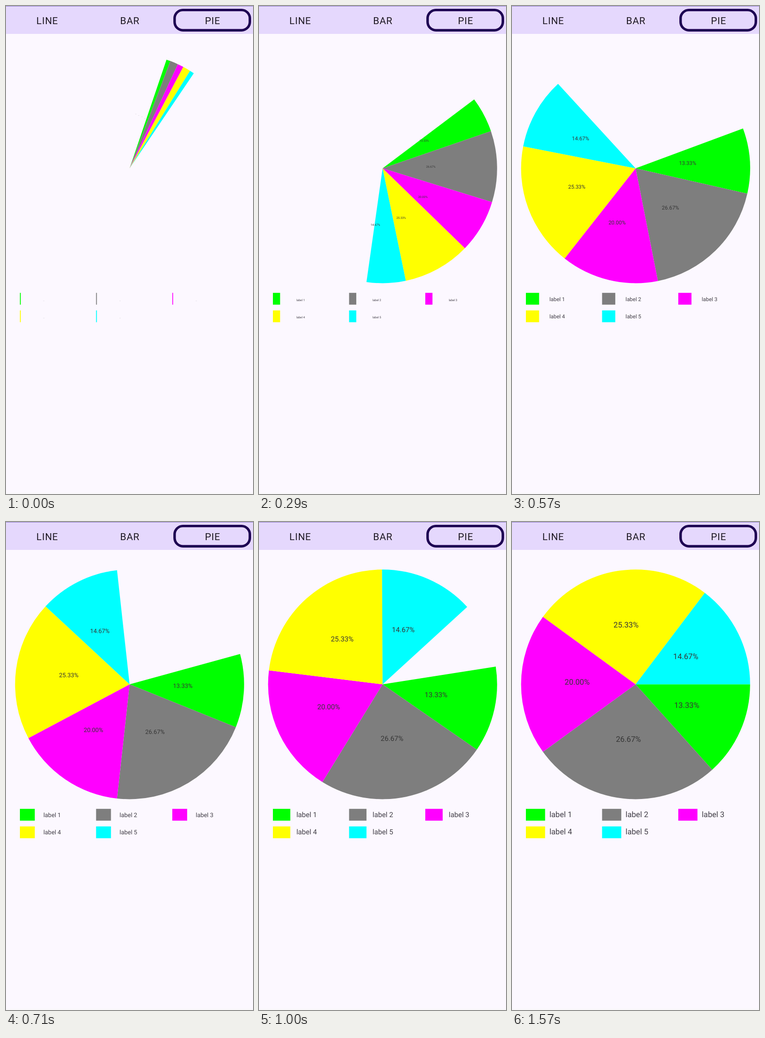
These frames come from a looping animation (533x1050 px, 1.71 s). An HTML page:

```html
<!DOCTYPE html>
<html lang="en">
<head>
<meta charset="utf-8">
<title>Pie chart</title>
<style>
  html, body { margin: 0; width: 100%; height: 100%; overflow: hidden; background: #fcf8ff; }
  svg { display: block; width: 100%; height: 100%; }
  text { font-family: Roboto, "Open Sans", sans-serif; fill: #423f47; text-rendering: geometricPrecision; }
  .tab { font-size: 21px; letter-spacing: .75px; text-anchor: middle; fill: #1f1a24; }
  .share { fill: #363636; }
</style>
</head>
<body>
<svg id="stage" viewBox="0 0 533 1050">
  <rect width="533" height="60" fill="#e5d8fd"/>
  <rect width="533" height="1" fill="#9480d0"/>
  <rect x="363.8" y="8.6" width="162.4" height="43.6" rx="18" fill="none" stroke="#1d0052" stroke-width="5.4"/>
  <text class="tab" x="89.1" y="38.6">LINE</text>
  <text class="tab" x="267.3" y="38.6">BAR</text>
  <text class="tab" x="445.8" y="38.6">PIE</text>
  <rect y="1047" width="533" height="3" fill="#faf8fb"/>
</svg>
<script>
const LOOP = 1710, CX = 266.7, CY = 349.3, R = 247.1, FONT = 16.7;
const shares = [13.33, 26.67, 20, 25.33, 14.67];
const colors = ['#00ff00', '#7e7e7e', '#ff00ff', '#ffff00', '#00ffff'];

// Each step: start time (ms), growth 0..1, start angle (degrees)
const steps = [
  [0, .0425, -71.2], [140, .165, -54.8], [290, .375, -36.9], [430, .553, -26.5],
  [570, .688, -20.3], [710, .775, -15.3], [860, .852, -11.8], [1000, .907, -8.9],
  [1140, .95, -6.4], [1290, .978, -4.25], [1430, .994, -2], [1570, 1, 0]
];

const stage = document.getElementById('stage');

function add(tag, attrs, text = '') {
  const el = document.createElementNS('http://www.w3.org/2000/svg', tag);
  set(el, attrs);
  el.textContent = text;
  return stage.appendChild(el);
}

function set(el, attrs) {
  for (const name in attrs) el.setAttribute(name, attrs[name]);
}

function polar(deg, r) {
  const a = deg * Math.PI / 180;
  return [CX + r * Math.cos(a), CY + r * Math.sin(a)];
}

const slices = colors.map(fill => add('path', { fill }));
const items = shares.map((share, i) => {
  const x = 30 + i % 3 * 164.4, y = 617.2 + Math.floor(i / 3) * 37.8;
  return {
    share,
    slice: slices[i],
    value: add('text', { class: 'share' }, share.toFixed(2) + '%'),
    swatch: add('rect', { x, y, height: 25.4, fill: colors[i] }),
    label: add('text', { x: x + 50.7, y: y + 17.4 }, 'label ' + (i + 1))
  };
});

function draw(grow, angle) {
  const size = { 'font-size': FONT * grow };
  for (const { share, slice, value, swatch, label } of items) {
    const sweep = share * 3.6 * grow;
    const [x, y] = polar(angle + sweep / 2, R / 2);
    set(slice, { d: `M${CX} ${CY}L${polar(angle, R)}A${R} ${R} 0 0 1 ${polar(angle + sweep, R)}Z` });
    set(value, { x: x - 29.6, y: y + .4, ...size });
    set(swatch, { width: 41.4 * grow });
    set(label, size);
    angle += sweep;
  }
}

const begin = performance.now();
function tick() {
  const t = (performance.now() - begin) % LOOP;
  const [, grow, angle] = steps.findLast(step => step[0] <= t);
  draw(grow, angle);
  requestAnimationFrame(tick);
}
tick();
</script>
</body>
</html>
```
